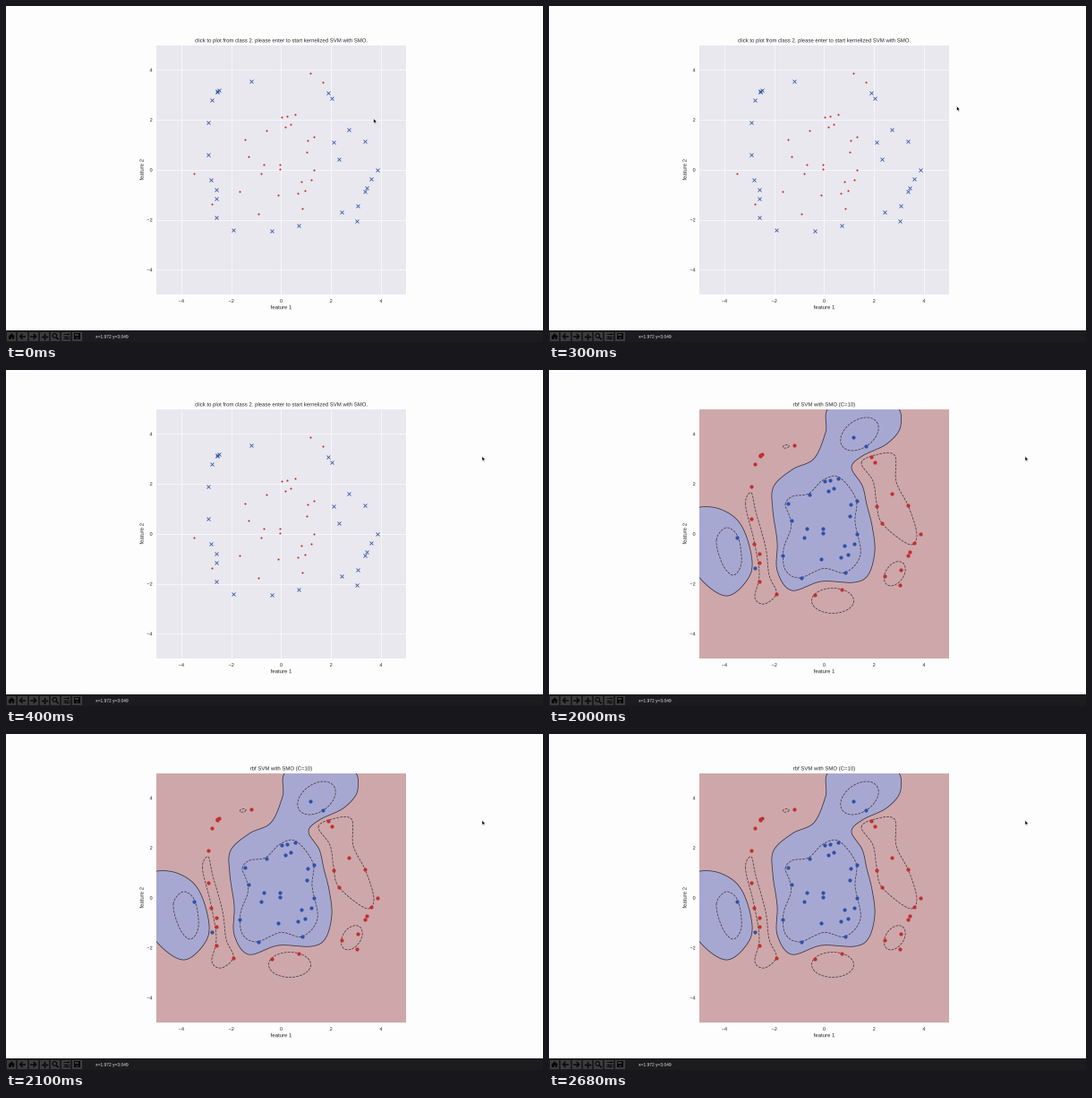
A matplotlib script for the animation above (3 s loop, 600 by 375 pixels).

```python
import numpy as np
import matplotlib.pyplot as plt
from matplotlib.animation import FuncAnimation
from matplotlib.patches import PathPatch, Polygon, Rectangle
from matplotlib.textpath import TextPath
from matplotlib.transforms import Affine2D

W, H, DPI = 600, 375, 100
PT = 72 / DPI                                  # points per pixel
LEFT, TOP, SIDE = 168.1, 43.5, 278.7           # plot area
UNIT, CX, CY = SIDE / 10, LEFT + SIDE / 2, TOP + SIDE / 2
INK, PANEL, BUTTON, ICON = "#262626", "#e9e8ef", "#3c3c3d", "#080808"
RED, BLUE = "#c0302f", "#2e51a8"

plt.rcParams["font.family"] = "Liberation Sans"
fig = plt.figure(figsize=(W / DPI, H / DPI), dpi=DPI, facecolor="#fdfdfd")
ax = fig.add_axes([0, 0, 1, 1])
ax.set(xlim=(0, W), ylim=(H, 0))
ax.axis("off")


def box(x, y, width, height, color, **style):
    return ax.add_patch(Rectangle((x, y), width, height, fc=color,
                                  ec="none", **style))


def label(text, x, y, size=6, align=0.5, angle=0, color=INK):
    """Text with its baseline at y; align is 0 left, 0.5 centre, 1 right."""
    path = TextPath((0, 0), text, size=size)
    ext = path.get_extents()
    move = Affine2D().translate(-ext.x0 - align * ext.width, 0).scale(1, -1)
    move = move.rotate_deg(-angle).translate(x, y)
    return ax.add_patch(PathPatch(move.transform_path(path), fc=color, lw=0))


def smooth(*points):
    """Closed Catmull-Rom curve through the points."""
    p = np.array(points, float)
    a, b, c, d = (np.roll(p, s, 0)[:, None, :] for s in (1, 0, -1, -2))
    t = np.linspace(0, 1, 12, endpoint=False)[None, :, None]
    curve = b + t / 2 * (c - a + t * (2 * a - 5 * b + 4 * c - d
                                      + t * (3 * b - a - 3 * c + d)))
    return curve.reshape(-1, 2)


def oval(x, y, rx, ry, tilt=0):
    t = np.linspace(0, 2 * np.pi, 60)
    ring = np.column_stack([rx * np.cos(t), ry * np.sin(t)])
    return Affine2D().rotate_deg(tilt).translate(x, y).transform(ring)


def marks(points, shape, color, size, **style):
    return ax.plot(*points.T, shape, color=color, ms=size * PT, **style)[0]


def add_axes_parts():
    for v in range(-4, 5, 2):
        x, y = CX + v * UNIT, CY - v * UNIT
        for line in (([x, x], [TOP, TOP + SIDE]),
                     ([LEFT, LEFT + SIDE], [y, y])):
            ax.plot(*line, color="white", lw=0.6 * PT)
        name = str(v).replace("-", "\u2212")
        label(name, x, 331, 5.5)
        label(name, 163.4, y + 2, 5.5, align=1)
    label("feature 1", CX, 338.2)
    label("feature 2", 153.6, CY, angle=90)


def add_toolbar():
    box(0, 362, W, 13, "#1c1b1d")
    centers = 6.3 + 12.2 * np.arange(7)
    for x in centers:
        box(x - 5.1, 363.8, 10.2, 10.2, BUTTON)
    home, back, forward, pan, zoom, sliders, save = centers
    y = 368.8

    def stroke(xs, ys, width=1.2):
        ax.plot(xs, ys, color=ICON, lw=width * PT, solid_capstyle="butt")

    ax.add_patch(Polygon([(home - 4, y + .4), (home, y - 3.6),
                          (home + 4, y + .4)], fc=ICON, lw=0))
    box(home - 3, y, 2.2, 3.5, ICON)
    box(home + .8, y, 2.2, 3.5, ICON)
    box(home - 1, y, 2, 1.2, ICON)
    for x, s in ((back, 1), (forward, -1)):
        stroke([x - 2 * s, x + 3.6 * s], [y, y], 1.5)
        stroke([x, x - 3 * s, x], [y - 3, y, y + 3], 1.5)
    stroke([pan - 3, pan + 3], [y, y])
    stroke([pan, pan], [y - 3, y + 3])
    for tip, dx, dy in (("<", -3, 0), (">", 3, 0), ("^", 0, -3), ("v", 0, 3)):
        marks(np.array([(pan + dx, y + dy)]), tip, ICON, 2.6, mew=0)
    stroke(*oval(zoom - .8, y - .9, 2.3, 2.3).T)
    stroke([zoom + 1, zoom + 3.5], [y + .8, y + 3.5], 1.6)
    for dy, knob in ((-2.5, 1.5), (0, -1.7), (2.5, .7)):
        stroke([sliders - 3.7, sliders + 3.7], [y + dy, y + dy], 0.9)
        stroke([sliders + knob] * 2, [y + dy - 1, y + dy + 1])
    box(save - 3.5, y - 3.5, 7, 7, ICON)
    box(save - 2, y - 2.8, 4, 2, BUTTON)
    marks(np.array([(save, y + 1.5)]), "o", BUTTON, 2, mew=0)
    label("x=1.972 y=3.049", 100.2, 370.6, 4.9, align=0, color="#f2f2f2")


class_one = np.array([
    (339.5, 75), (353.5, 85), (308, 124), (314, 123), (323, 121),
    (312, 135), (318, 132), (290.7, 138.5), (266.5, 149), (337, 149.5),
    (344, 145.5), (336, 163), (270.6, 167.5), (288.4, 177), (306, 177),
    (305.7, 181.6), (284.5, 186.5), (344, 183), (330.4, 196),
    (341, 193.5), (261.4, 207), (304, 210.6), (326, 209), (334.4, 206),
    (331, 225.5), (281.5, 231.7), (210, 187), (230, 220.5)])
class_two = np.array([
    (273.8, 83.6), (235.7, 95), (236.2, 96), (238, 94), (230, 105),
    (226, 129.6), (226, 166), (229, 193.5), (235, 205),
    (235, 215), (235, 236), (254.4, 250), (296.6, 251), (327, 245.4),
    (359.5, 96.6), (363.6, 102.8), (383, 138.4), (401, 150.6),
    (365.7, 151.5), (372, 171.4), (414.6, 182.7), (408.4, 192.7),
    (403.3, 203), (401.4, 207), (392.5, 223), (375, 230), (392, 240)])

core = smooth(
    (316, 40), (309, 70), (296, 99), (272, 111), (251, 130), (250, 156),
    (255, 192), (255, 224), (271, 246), (304, 236), (341, 237), (357, 228),
    (364, 202), (361, 174), (355, 150), (350, 129), (338, 109), (350, 96),
    (378, 82), (393, 62), (383, 38))
island = smooth((155, 161), (182, 153), (210, 167), (224, 197), (225, 228),
                (200, 252), (171, 235), (155, 205))

core_margin = smooth(
    (264, 150), (272, 141), (290, 138), (306, 123), (324, 119.5), (343, 144),
    (342, 170), (348, 206), (331, 226), (307, 221.5), (280, 232), (264, 223),
    (262, 200), (270, 178), (269, 164))
island_margin = smooth((187, 190), (198, 176), (211, 186), (215, 215),
                       (206, 229), (194, 217))
west_margin = smooth((219.5, 150), (226, 137), (231, 158), (242, 198),
                     (246, 229), (254, 249), (241, 261), (230, 254),
                     (235, 228), (229, 190))
east_margin = smooth((349, 104), (364, 95), (386, 95), (388, 125),
                     (402, 153), (411, 184), (402, 194.5), (372, 171),
                     (366, 148), (362, 124))
margins = [core_margin, island_margin, west_margin, east_margin,
           oval(347, 71.5, 23.5, 15.5, -35), oval(317, 257.5, 23.5, 14),
           oval(386.3, 227.3, 15, 10, -55), oval(264.7, 85.4, 3.5, 1.7, -10)]


def add_plotting_view():
    return [label("click to plot from class 2. please enter to start "
                  "kernelized SVM with SMO.", CX, 40.4),
            marks(class_one, "o", RED, 2.1, mew=0),
            marks(class_two, "x", BLUE, 3.5, mew=0.8 * PT)]


def add_result_view():
    parts = [label("rbf SVM with SMO (C=10)", CX, 40.4),
             box(LEFT, TOP, SIDE, SIDE, "#cea7aa", zorder=2.5)]
    for curve in (core, island):
        parts.append(ax.add_patch(Polygon(curve, fc="#a7a8d2", ec="#30303c",
                                          lw=0.75 * PT, zorder=2.6)))
        parts[-1].set_clip_path(area)
    for curve in margins:
        parts += ax.plot(*curve[np.r_[:len(curve), 0]].T, color="#40363c",
                         lw=0.75 * PT, ls=(0, (3.7, 1.6)), zorder=2.7)
    for points, color in ((class_one, BLUE), (class_two, RED)):
        parts.append(marks(points, "o", color, 4.2, mew=0, zorder=3))
    return parts


area = box(LEFT, TOP, SIDE, SIDE, PANEL)
add_axes_parts()
add_toolbar()
plotting, result = add_plotting_view(), add_result_view()

arrow = np.array([(0, 0), (0, 5.2), (1.2, 4.2), (2, 6), (2.9, 5.6),
                  (2.1, 3.9), (3.7, 3.8)])
cursor = ax.add_patch(Polygon(arrow, fc="black", ec="white", lw=0.5 * PT,
                              zorder=5))


def update(frame):
    if frame < 3:
        tip = (410.8, 125.6)
    else:
        tip = (455.6, 111.8) if frame == 3 else (531.9, 96.3)
    cursor.set_xy(arrow + tip)
    solved = frame >= 20
    for part in plotting:
        part.set_visible(not solved)
    for part in result:
        part.set_visible(solved)
    return [cursor, *plotting, *result]


anim = FuncAnimation(fig, update, frames=30, interval=100, repeat=True)
plt.show()
```
